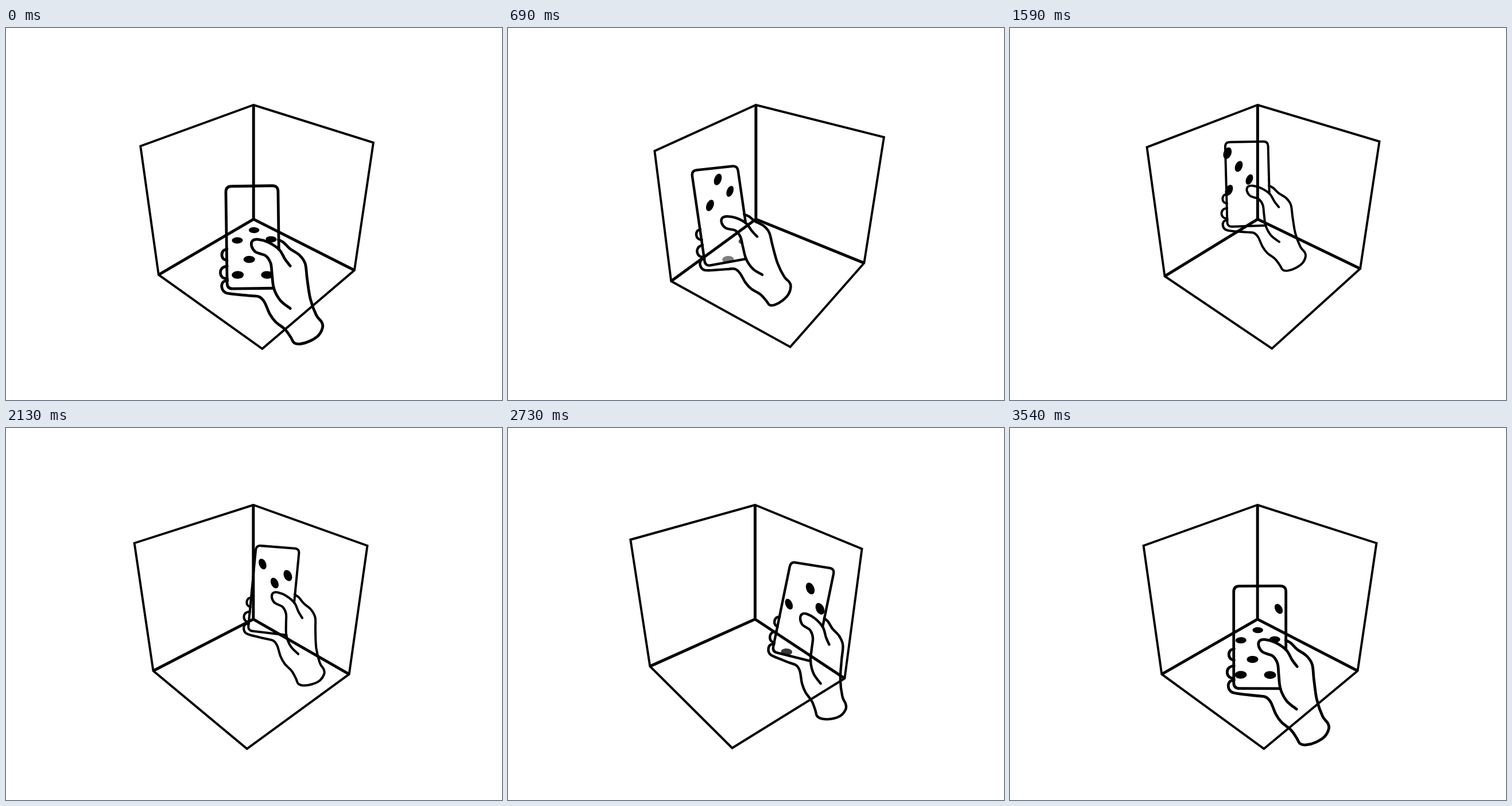
Animation of 864 by 648 pixels, one loop 3.57 s. Source, as an HTML page with a canvas:

```html
<!DOCTYPE html>
<html lang="en">
<head>
<meta charset="utf-8">
<title>Phone in a room</title>
<style>
  html, body { margin: 0; width: 100%; height: 100%; overflow: hidden; background: #fff; }
  canvas { display: block; width: 864px; height: 648px; }
</style>
</head>
<body>
<canvas id="stage" width="864" height="648"></canvas>
<script>
const ctx = document.getElementById('stage').getContext('2d');
const LOOP = 3570, PERIOD = 3600, STEP = 30, RAD = Math.PI / 180;
const HALF_W = 45.5, HALF_H = 89.3, DOT = .043;

// dot positions on each face of the unit room
const DOTS = {
  left: [[.457, .577], [.327, .42], [.555, .407], [.214, .578], [.098, .42], [.328, .727]],
  right: [[.103, .556], [.369, .557], [.237, .442], [.607, .56], [.401, .336], [.713, .444],
    [.232, .201]],
  floor: [[.118, .115], [.314, .116], [.12, .303], [.427, .353], [.614, .416], [.471, .57],
    [.569, .163], [.106, .508]]
};
const FACES = {
  left: (a, b) => [a, 0, b],
  right: (a, b) => [0, a, b],
  floor: (a, b) => [a, b, 0]
};

// hand outlines, measured from the middle of the phone
const THUMB = [[65, 51], [56, 39], [46, 22], [27, 9], [10, 4], [0, 6], [-2, 15], [4, 25],
  [13, 29], [23, 33], [31, 46], [33, 66], [36, 90], [47, 111], [64, 125]];
const BACK = [[45, 5], [54, 10], [65, 21], [81, 32], [91, 47], [94, 73], [99, 108],
  [109, 137], [118, 149], [120, 158], [113, 172], [98, 182], [81, 187], [70, 185],
  [64, 175], [54, 161], [38, 148], [28, 134], [19, 113], [10, 104], [-5, 102],
  [-40, 98], [-51, 94], [-55, 85], [-52, 77], [-45, 75]];
const FINGERS = [arc(-45, 30, 9, 10), arc(-45, 61, 12, 11.5)];

function arc(x, y, rx, ry) {
  return [90, 135, 180, 225, 270].map(a =>
    [x + rx * Math.cos(a * RAD), y + ry * Math.sin(a * RAD)]);
}

// triangle wave with soft turning points, from a sine or cosine
const soft = x => Math.asin(.985 * x) / Math.asin(.985);
const clamp = x => Math.min(1, Math.max(0, x));

function motion(t) {
  const phase = 2 * Math.PI * t / PERIOD + .056;
  const turn = 1.8 + 7.5 * soft(Math.sin(phase)), lift = soft(Math.cos(phase));
  const d = turn - 2.1;
  return {
    turn,
    x: 429.5 - 10 * d + .15 * d * d - 1.2 * (1 - lift),
    y: 315 + 49.8 * lift,
    scale: .905 + .095 * lift,
    roll: (-.8 - 1.4 * d + .02 * d * d + .6 * (1 - lift)) * RAD,
    squeeze: 1 - .0012 * d * d,
    depth: .00006 * d
  };
}

// perspective view of the room, turned around its back corner
function roomView(turn) {
  const d = turn * RAD, s = Math.sin(Math.PI / 4 - d), c = Math.cos(Math.PI / 4 - d);
  return ([p, q, y]) => {
    const x = q * c - p * s, z = p * c + q * s;
    const w = 1 - .2127 * z - .1353 * y;
    return [431 + 6 * d + 205.1 * x / w, (333 + 40.9 * z - 217.1 * y) / w];
  };
}

// phone coordinates to the stage
function phoneView(m) {
  const c = Math.cos(m.roll), s = Math.sin(m.roll);
  return ([x, y]) => {
    const k = m.scale / (1 + m.depth * x), px = x * m.squeeze * k, py = y * k;
    return [m.x + px * c - py * s, m.y + px * s + py * c];
  };
}

// stage back to phone coordinates
function phoneInverse(m) {
  const c = Math.cos(m.roll) / m.scale, s = Math.sin(m.roll) / m.scale;
  return ([sx, sy]) => {
    const dx = sx - m.x, dy = sy - m.y, px = dx * c + dy * s, py = dy * c - dx * s;
    const x = px / (m.squeeze - m.depth * px);
    return [x, py * (1 + m.depth * x)];
  };
}

function line(points) {
  ctx.beginPath();
  points.forEach(p => ctx.lineTo(...p));
}

function curve(pts) {
  ctx.beginPath();
  ctx.moveTo(...pts[0]);
  for (let i = 0; i < pts.length - 1; i++) {
    const a = pts[i - 1] || pts[i], b = pts[i], c = pts[i + 1], d = pts[i + 2] || c;
    ctx.bezierCurveTo(b[0] + (c[0] - a[0]) / 6, b[1] + (c[1] - a[1]) / 6,
      c[0] - (d[0] - b[0]) / 6, c[1] - (d[1] - b[1]) / 6, ...c);
  }
  ctx.stroke();
}

// dots show only through the screen; the palm hides the walls low down
function drawDots(view, inverse) {
  ctx.fillStyle = '#000';
  for (const face in DOTS) {
    const low = face === 'floor' ? HALF_H - 3 : 30;
    for (const [a, b] of DOTS[face]) {
      const [x, y] = inverse(view(FACES[face](a, b)));
      const inside = Math.min(x + HALF_W, HALF_W - 6 - x, y + HALF_H - 5, low - y);
      ctx.globalAlpha = clamp(inside / 4);
      line(Array.from({ length: 28 }, (_, i) => {
        const k = i / 28 * 2 * Math.PI;
        return view(FACES[face](a + DOT * Math.cos(k), b + DOT * Math.sin(k)));
      }));
      ctx.fill();
    }
  }
  ctx.globalAlpha = 1;
}

function drawPhone(view) {
  const r = 10;
  ctx.beginPath();
  ctx.moveTo(...view([36, HALF_H]));
  for (const [i, j, flat] of [[-1, 1, 1], [-1, -1, 0], [1, -1, 1]]) {
    const x = i * HALF_W, y = j * HALF_H;
    const onRow = [x - i * r, y], onSide = [x, y - j * r];
    ctx.lineTo(...view(flat ? onRow : onSide));
    ctx.quadraticCurveTo(...view([x, y]), ...view(flat ? onSide : onRow));
  }
  ctx.lineTo(...view([HALF_W, 22]));
  ctx.stroke();
}

function drawHand(view) {
  line([...THUMB.slice(2, 13).reverse(), ...BACK.slice(0, 15)].map(view));
  ctx.fillStyle = '#fff';
  ctx.fill();
  drawPhone(view);
  [THUMB, BACK, ...FINGERS].forEach(part => curve(part.map(view)));
}

function drawRoom(view) {
  const stroke = (width, ...pts) => {
    line(pts.map(view));
    ctx.lineWidth = width;
    ctx.stroke();
  };
  const corner = [0, 0, 0], top = [0, 0, 1];
  const left = [1, 0, 0], right = [0, 1, 0];
  ctx.lineCap = 'butt';
  ctx.lineJoin = 'miter';
  stroke(3.9, top, [1, 0, 1], left, [1, 1, 0], right, [0, 1, 1], top, [1, 0, 1]);
  stroke(5, left, corner, right);
  stroke(5, top, corner);
}

function draw(t) {
  const m = motion(t), room = roomView(m.turn);
  ctx.clearRect(0, 0, 864, 648);
  ctx.strokeStyle = '#000';
  drawDots(room, phoneInverse(m));
  ctx.lineCap = ctx.lineJoin = 'round';
  ctx.lineWidth = 4.8 * m.scale;
  drawHand(phoneView(m));
  drawRoom(room);
}

let start;
function tick(now) {
  start ??= now;
  draw(Math.floor((now - start) % LOOP / STEP) * STEP);
  requestAnimationFrame(tick);
}
draw(0);
requestAnimationFrame(tick);
</script>
</body>
</html>
```
